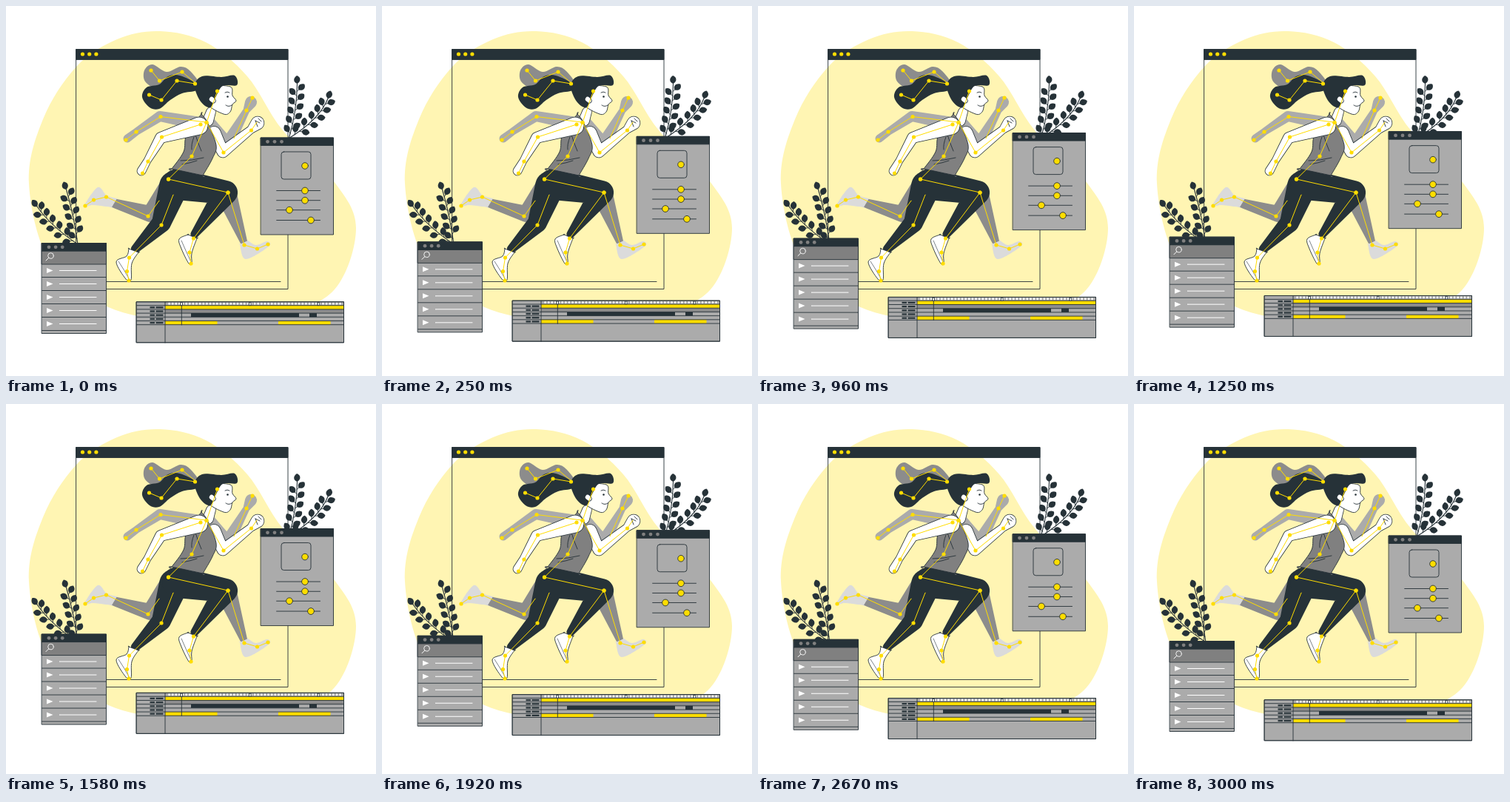
Animation of 500 by 500 pixels, one loop 3040 ms. Source, as an HTML page with a canvas:

```html
<!DOCTYPE html>
<html lang="en">
<head>
<meta charset="utf-8">
<title>Runner animation</title>
<style>
html, body { margin: 0; width: 100%; height: 100%; overflow: hidden; background: #fff; }
canvas { display: block; width: 500px; height: 500px; }
</style>
</head>
<body>
<canvas id="stage"></canvas>
<script>
const INK = '#263238', YELLOW = '#ffdd00', PALE = '#fff5b3';
const GRAY = '#ababab', MID = '#808080', GHOST = '#8c8c8c', SHOE = '#dbdbdb';
const LOOP = 3040, STEP = 1000 / 24, FLOAT = 3000, RISE = 10;

const canvas = document.getElementById('stage');
const ctx = canvas.getContext('2d');
const scale = window.devicePixelRatio || 1;
canvas.width = canvas.height = 500 * scale;

const still = document.createElement('canvas');
still.width = still.height = 500 * scale;
let g = still.getContext('2d');

function paint(fill, stroke, width = 0.9) {
  if (fill) { g.fillStyle = fill; g.fill(); }
  if (stroke) {
    g.strokeStyle = stroke;
    g.lineWidth = width;
    g.lineJoin = g.lineCap = 'round';
    g.stroke();
  }
}

const points = text => text.split(' ').map(p => p.split(',').map(Number));

// Smooth closed curve; a doubled point makes a corner.
function blob(text, fill, stroke) {
  const p = points(text), n = p.length;
  g.beginPath();
  g.moveTo(...p[0]);
  for (let i = 0; i < n; i++) {
    const a = p[(i + n - 1) % n], b = p[i], c = p[(i + 1) % n], d = p[(i + 2) % n];
    g.bezierCurveTo(
      b[0] + (c[0] - a[0]) / 6, b[1] + (c[1] - a[1]) / 6,
      c[0] - (d[0] - b[0]) / 6, c[1] - (d[1] - b[1]) / 6, c[0], c[1]);
  }
  g.closePath();
  paint(fill, stroke);
}

// Tapered tube through joints given as x,y,radius.
function limb(text, fill, stroke) {
  const joints = points(text);
  g.beginPath();
  for (let i = 1; i < joints.length; i++) {
    const [x, y, r] = joints[i - 1], [u, v, s] = joints[i];
    const dir = Math.atan2(v - y, u - x);
    const side = Math.acos((r - s) / Math.hypot(u - x, v - y));
    g.moveTo(x + r * Math.cos(dir + side), y + r * Math.sin(dir + side));
    g.arc(x, y, r, dir + side, dir - side + 2 * Math.PI);
    g.arc(u, v, s, dir - side, dir + side);
    g.closePath();
  }
  paint(null, stroke, 1.6);
  paint(fill);
}

function line(text, color = INK, width = 0.9) {
  g.beginPath();
  points(text).forEach(p => g.lineTo(...p));
  paint(null, color, width);
}

function curve(d, width = 0.9) {
  g.strokeStyle = INK;
  g.lineWidth = width;
  g.lineCap = 'round';
  g.stroke(new Path2D(d));
}

function dot(x, y, r, fill, stroke) {
  g.beginPath();
  g.arc(x, y, r, 0, 7);
  paint(fill, stroke);
}

function rect(x, y, w, h, fill, stroke) {
  g.beginPath();
  g.rect(x, y, w, h);
  paint(fill, stroke);
}

function dots(x, y, gap, r, fill) {
  for (let i = 0; i < 3; i++) dot(x + gap * i, y, r, fill);
}

// A chain of bones with a dot at each joint except the bare one.
function bone(text, bare) {
  line(text, YELLOW, 1);
  points(text).forEach(([x, y], i) => i === bare || dot(x, y, 2.6, YELLOW));
}

function leaf(x, y, angle, stalk) {
  g.save();
  g.translate(x, y);
  g.rotate(angle);
  line(`0,0 ${stalk + 2},0`, INK, 0.8);
  g.beginPath();
  g.moveTo(stalk, 0);
  g.bezierCurveTo(stalk + 2, -6, stalk + 8, -5.5, stalk + 11, -0.5);
  g.bezierCurveTo(stalk + 9, 5, stalk + 3, 5.5, stalk, 0);
  paint(INK);
  g.restore();
}

function plant(text) {
  const [a, b, c] = points(text);
  g.beginPath();
  g.moveTo(...a);
  g.quadraticCurveTo(...b, ...c);
  paint(null, INK, 1.1);
  const at = (t, k) => (1 - t) ** 2 * a[k] + 2 * t * (1 - t) * b[k] + t * t * c[k];
  const slope = (t, k) => (1 - t) * (b[k] - a[k]) + t * (c[k] - b[k]);
  for (let i = 0; i < 10; i++) {
    const t = 0.1 + 0.085 * i;
    const turn = i % 2 ? 0.8 : -0.8;
    leaf(at(t, 0), at(t, 1), Math.atan2(slope(t, 1), slope(t, 0)) + turn, 3);
  }
  leaf(...c, Math.atan2(c[1] - b[1], c[0] - b[0]), 0);
}

function scenery() {
  blob('31,240 50,153 95,82 150,45 208,34 270,49 326,95 374,168 443,237 473,300 444,383 370,415 235,425 136,406 60,347', PALE);
  rect(95, 58.5, 286, 324, null, INK);
  rect(95, 58.5, 286, 14, INK, INK);
  dots(103.5, 65, 9.2, 2.6, YELLOW);
  line('120,372.5 371,372.5');
  plant('382,180 393,143 393.5,105');
  plant('382,179 424,153 435,125');
  plant('97,322 92,284 81.5,248');
  plant('97,322 60,297 42,271');
}

function shadowPose() {
  blob('259,105 249,88 236,82 217,89 198,79 187,87 188,102 204,111 226,103', GHOST);
  limb('262,159,9 208,149,7 176,170,5 164,179,5.5', GRAY);
  limb('274,158,9 299,187,9 325,141,4.5 331,130,8', GRAY);
  limb('214,246,9 195,281,11 144,266,6', GHOST);
  blob('124,245 136,256 150,260 150,260 143,272 143,272 118,269 106,270', SHOE);
  limb('298,255,14 321,318,5', GHOST);
  blob('316,322 316,322 327,317 327,317 338,323 353,318 355,325 324,342', SHOE);
}

function runner() {
  limb('281,172,9 293,197,7.5 331,167,5 340,158,8.5', '#fff', INK);
  curve('M337 155 L343 158 M337 155 L340 163 M341 152 L345 156');

  limb('227,243,20 210,293,13 175,328,6', INK);
  limb('232,241,21 297,252,16 255,308,5.5', INK);
  blob('166,328 166,328 163,338 149,346 162,369 169,370 170,348 179,333 179,333', '#fff', INK);
  blob('246,309 246,309 234,315 237,328 247,348 251,347 251,334 258,314 258,314', '#fff', INK);
  curve('M152 345 Q160 357 167 370 M237 317 Q243 331 250 346', 0.6);

  limb('277,143,6 273,155,7', '#fff', INK);
  blob('264,146 264,146 272,157 284,188 279,206 266,229 266,229 224,220 224,220 240,197 244,174', MID, INK);
  curve('M236 209 Q252 209 267 205 M238 214 Q250 212 258 209 M254 177 Q250 187 251 194 M256 174 Q260 187 264 196');

  blob('276,110 303,109 306,121 311,128 306,133 303,143 294,146 272,132', '#fff', INK);
  blob('257,105 235,94 219,95 207,106 190,110 184,123 194,137 207,139 222,127 238,118 257,114', INK);
  blob('255,108 265,95 291,96 309,94 312,107 293,108 284,122 276,137 263,129', INK);
  limb('278,126,3.2 280,128,2.8', '#fff', INK);
  dot(299.5, 122.5, 1.3, INK);
  curve('M296 117 Q299 115 302 117 M297 134 Q301 137 305 134');

  limb('261,162,11.5 209,178,7 191,209,4.5 183,223,5.5', '#fff', INK);
}

function skeleton() {
  bone('196,87 207.5,101 238,89 257,105', 3);
  bone('193.5,120 210,127 231,101 255.5,105');
  bone('270,157 209,149.5 176,170 162,181', 0);
  bone('333,124 325,141 308,179', 2);
  bone('207,263 192,284 135.5,258 118.5,262 107,270', 0);
  bone('300,252 322,323 339.5,328 354,322');
  bone('285.5,115 271,157.5 251,203 219.5,234');
  bone('263,160 210.5,177 192,210 184.5,226');
  bone('271,157.5 294,198 331.5,168 339,157', 3);
  bone('219.5,234 300,252 253.5,314 248,333 250,348');
  bone('226,255 210,296 166.5,340 163.5,358.5 166,371', 0);
}

function controls() {
  rect(344.5, 178, 98, 131, GRAY, INK);
  rect(344.5, 178, 98, 10.5, INK, INK);
  dots(353.5, 183.3, 9.5, 2.4, MID);
  g.beginPath();
  g.roundRect(372, 197, 40, 37, 3.5);
  paint(null, INK);
  dot(404, 216, 4.3, YELLOW, INK);
  for (const [x, y] of points('404,249.5 404,262.7 383,275.7 412,289.5')) {
    line(`365.5,${y} 424.5,${y}`);
    dot(x, y, 4.4, YELLOW, INK);
  }
}

function list() {
  rect(48.5, 320.5, 87, 122, GRAY, INK);
  rect(48.5, 331, 87, 18, MID, INK);
  rect(48.5, 320.5, 87, 10.5, INK, INK);
  dots(58, 325.8, 9.1, 2.4, MID);
  dot(60.5, 337.5, 3.8, null, '#fff');
  line('57.5,340.5 54,344', '#fff', 1);
  for (let i = 0; i < 5; i++) {
    const y = 357.5 + 18 * i;
    g.beginPath();
    g.moveTo(55, y - 3.5);
    g.lineTo(63.5, y);
    g.lineTo(55, y + 3.5);
    paint('#fff');
    line(`72,${y} 122,${y}`, '#fff', 1);
    line(`48.5,${y + 9} 135.5,${y + 9}`);
  }
}

function timeline() {
  const top = 404.7, row = 5.2;
  const bar = (n, x, end, fill) => rect(x, top + row * n, end - x, row, fill);
  rect(176.5, 399.8, 280, 55, GRAY, INK);
  for (let x = 219.5; x < 455; x += 4.62) rect(x, 400.8, 2.2, 2.8, '#fff');
  bar(0, 215, 456.5, YELLOW);
  bar(1, 215, 456.5, GHOST);
  bar(2, 250, 396, INK);
  bar(2, 410, 420, INK);
  bar(4, 215, 285.5, YELLOW);
  bar(4, 368, 438.5, YELLOW);
  for (let i = 0; i < 6; i++) {
    const y = top + row * i;
    line(`176.5,${y} 456.5,${y}`);
    if (i === 5) break;
    rect(194.5, y + 1.5, 6.5, 2.2, INK);
    rect(202.5, y + 1.5, 10, 2.2, INK);
  }
  line('215,400 215,455');
  rect(176.5, 399.8, 280, 55, null, INK);
  line('237.3,401 237.3,431');
  for (let i = 0; i < 3; i++) rect(236.1 + 92.6 * i, 400.6, 2.4, 4, '#fff', INK);
}

g.scale(scale, scale);
scenery();
shadowPose();
runner();
skeleton();
g = ctx;

function draw(now) {
  const step = Math.min(72, Math.floor((now % LOOP + 5) / STEP));
  const phase = step * STEP / FLOAT;
  const lift = RISE * (1 - Math.abs(1 - 2 * phase));
  g.setTransform(1, 0, 0, 1, 0, 0);
  g.fillStyle = '#fff';
  g.fillRect(0, 0, canvas.width, canvas.height);
  g.drawImage(still, 0, 0);
  g.setTransform(scale, 0, 0, scale, 0, -lift * scale);
  controls();
  list();
  timeline();
}

function tick() {
  draw(performance.now());
  requestAnimationFrame(tick);
}
tick();
</script>
</body>
</html>
```
